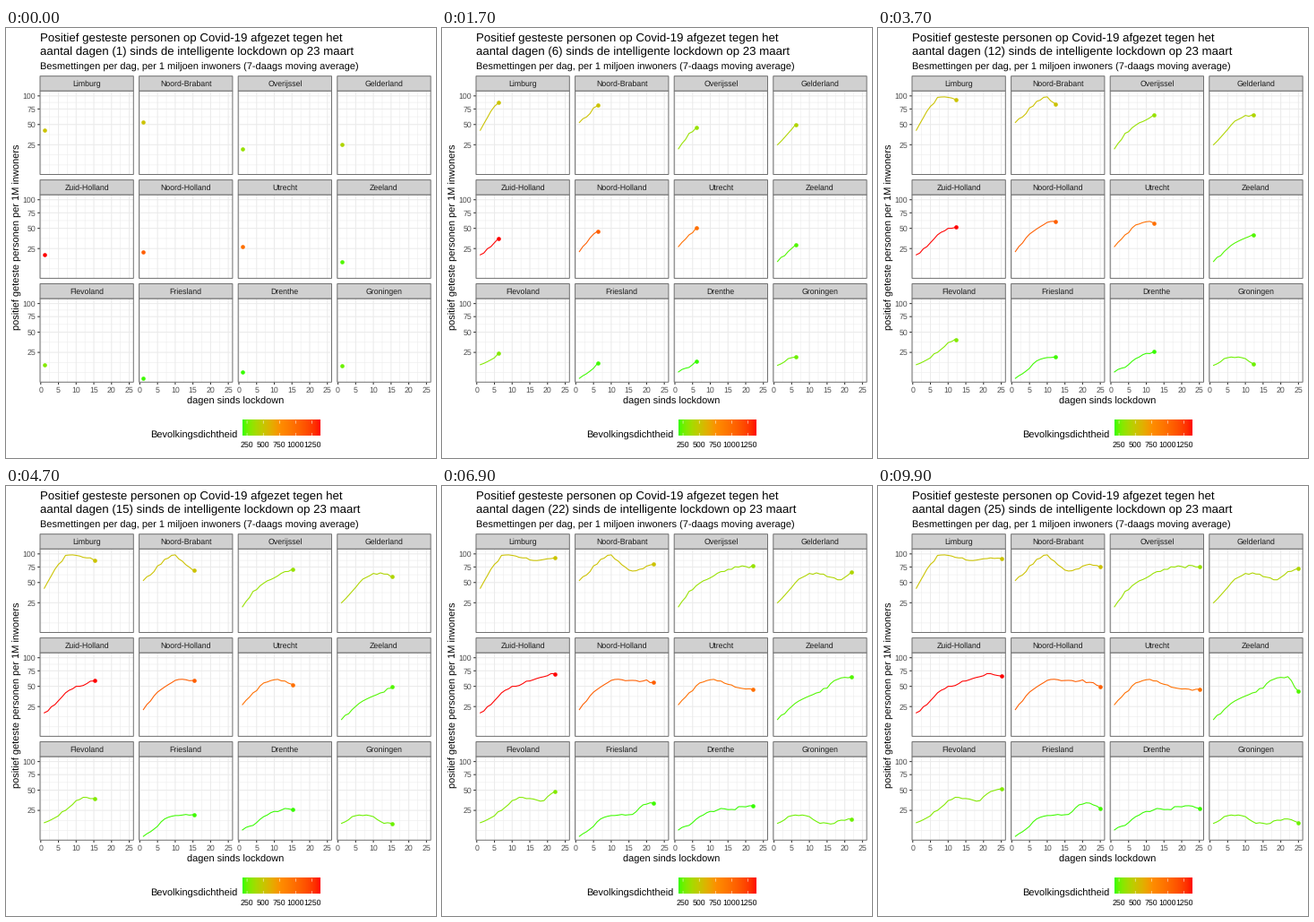
A matplotlib script that plays this animation: 480x480 px, repeating every 10 s.

```python
import numpy as np
import matplotlib.pyplot as plt
from matplotlib.animation import FuncAnimation
from matplotlib.collections import LineCollection
from matplotlib.colors import to_rgb
from matplotlib.patches import Rectangle

plt.rcParams.update({
    "font.family": "Liberation Sans",
    "text.hinting": "none",
    "path.snap": False,
})

SIZE = 480
FRAMES, MOVING, INTERVAL = 100, 80, 100

# Layout in pixels, y pointing down
LEFT, PANEL_W, COL_PITCH = 38, 104.3, 110.6
TOP, PANEL_H, ROW_PITCH, STRIP_H = 70.2, 93.3, 115.9, 16.5
RIGHT = LEFT + 3 * COL_PITCH + PANEL_W
BAR_X, BAR_Y, BAR_W, BAR_H = 264.2, 438.2, 86.4, 17.3

LINE_W, THIN_W = 1.07, 0.53
DARK, BORDER, TEXT = "#333333", "#707070", "#4d4d4d"
GRID, STRIP = "#ebebeb", "#d0d0d0"

# Scales: x linear, y square root, both with 5 % expansion
DAYS = np.arange(1, 26)
X_LO, X_HI = 1 - 0.05 * 24, 25 + 0.05 * 24
ROOT_MIN, ROOT_MAX = np.sqrt(5.5), np.sqrt(102.5)
PAD = 0.05 * (ROOT_MAX - ROOT_MIN)
DENSITY_LO, DENSITY_HI, DENSITY_MID = 183, 1374, 770

# Name, population density, cases on every third day
KEY_DAYS = DAYS[::3]
PROVINCES = [
    ("Limburg", 520, (42, 71, 97, 97, 92, 87, 89, 92, 91)),
    ("Noord-Brabant", 522, (53, 67, 89, 98, 79, 68, 72, 80, 75)),
    ("Overijssel", 348, (21, 38, 49, 57, 67, 71, 77, 78, 75)),
    ("Gelderland", 418, (25, 38, 55, 64, 63, 58, 54, 67, 73)),
    ("Zuid-Holland", 1374, (19, 27, 41, 50, 54, 60, 65, 70, 66)),
    ("Noord-Holland", 1075, (22, 37, 49, 59, 60, 59, 58, 56, 50)),
    ("Utrecht", 970, (27, 41, 55, 60, 58, 52, 47, 46, 46)),
    ("Zeeland", 214, (13.5, 22, 31, 37, 42, 54, 63, 65, 43)),
    ("Flevoland", 298, (14, 18, 25, 36, 40, 38, 36, 48, 52)),
    ("Friesland", 194, (5.5, 9.5, 17, 20, 21, 21, 31, 33, 27)),
    ("Drenthe", 187, (9, 12, 19, 24, 27, 26, 29, 30, 27)),
    ("Groningen", 252, (13.5, 19, 20, 19, 13.5, 13, 16, 17, 14)),
]
rng = np.random.default_rng(23)


def daily_roots(cases):
    """Daily values on the root scale, with a slight wobble between key days."""
    wobble = rng.normal(0, 0.06, DAYS.size) * ~np.isin(DAYS, KEY_DAYS)
    return np.interp(DAYS, KEY_DAYS, np.sqrt(cases)) + wobble


# Colour scale, blended in CIE Lab
TO_XYZ = np.array([[0.4124, 0.3576, 0.1805],
                   [0.2126, 0.7152, 0.0722],
                   [0.0193, 0.1192, 0.9505]])
WHITE = TO_XYZ.sum(axis=1)


def to_lab(color):
    c = np.array(to_rgb(color))
    lin = np.where(c > 0.04045, ((c + 0.055) / 1.055) ** 2.4, c / 12.92)
    fx, fy, fz = np.cbrt(TO_XYZ @ lin / WHITE)
    return np.array([116 * fy - 16, 500 * (fx - fy), 200 * (fy - fz)])


def from_lab(lab):
    fy = (lab[0] + 16) / 116
    f = np.array([fy + lab[1] / 500, fy, fy - lab[2] / 200])
    xyz = WHITE * np.where(f > 0.207, f ** 3, (f - 16 / 116) / 7.787)
    lin = np.clip(np.linalg.solve(TO_XYZ, xyz), 0, 1)
    return np.where(lin > 0.0031308, 1.055 * lin ** (1 / 2.4) - 0.055, 12.92 * lin)


STOPS = np.array([to_lab(c) for c in ("#00ff00", "#ff8c00", "#ff0000")])


def density_color(density):
    reach = max(DENSITY_HI - DENSITY_MID, DENSITY_MID - DENSITY_LO)
    t = (density - DENSITY_MID) / reach
    lab = [np.interp(t, [-1, 0, 1], STOPS[:, k]) for k in range(3)]
    return np.clip(from_lab(np.array(lab)), 0, 1)


fig = plt.figure(figsize=(SIZE / 72, SIZE / 72), dpi=72, facecolor="white")
ax = fig.add_axes([0, 0, 1, 1])
ax.axis("off")


def label(x, y, text, size, color="black", ha="center", va="baseline", **kw):
    return ax.text(x, y, text, size=size, color=color, ha=ha, va=va, **kw)


def segments(lines, width, color, z):
    ax.add_collection(LineCollection(lines, linewidths=width, colors=[color], zorder=z))


def box(x, y, w, h, fill):
    ax.add_patch(Rectangle((x, y), w, h, facecolor=fill, edgecolor=BORDER,
                           linewidth=1, zorder=5, snap=True))


def x_pos(day, left):
    return left + (day - X_LO) / (X_HI - X_LO) * PANEL_W


def y_pos(root, top):
    return top + (ROOT_MAX + PAD - root) / (ROOT_MAX - ROOT_MIN + 2 * PAD) * PANEL_H


X_TICKS = np.arange(0, 26, 5)
Y_TICKS = np.arange(25, 101, 25)
ROOTS = np.sqrt(Y_TICKS)
below = 2 * ROOTS[0] - ROOTS[1]
wide = np.append(below, ROOTS)
Y_MINOR = np.append(below, (wide[1:] + wide[:-1]) / 2)


def grid(left, top, days, levels, width, z):
    lines = [[(x, top), (x, top + PANEL_H)] for x in x_pos(days, left)]
    lines += [[(left, y), (left + PANEL_W, y)] for y in y_pos(levels, top)]
    segments(lines, width, GRID, z)


curves = []
for i, (name, density, cases) in enumerate(PROVINCES):
    row, col = divmod(i, 4)
    left, top = LEFT + col * COL_PITCH, TOP + row * ROW_PITCH
    bottom = top + PANEL_H

    grid(left, top, X_TICKS[:-1] + 2.5, Y_MINOR, THIN_W, 1)
    grid(left, top, X_TICKS, ROOTS, LINE_W, 2)
    box(left, top, PANEL_W, PANEL_H, "none")
    box(left, top - STRIP_H, PANEL_W, STRIP_H, STRIP)
    label(left + PANEL_W / 2, top - 4.8, name, 8.8, "#1a1a1a", zorder=6)

    if col == 0:
        ys = y_pos(ROOTS, top)
        segments([[(left - 2.75, y), (left, y)] for y in ys], LINE_W, DARK, 4)
        for y, value in zip(ys, Y_TICKS):
            label(left - 4.9, y + 3.2, str(value), 8.8, TEXT, ha="right")
    if row == 2:
        xs = x_pos(X_TICKS, left)
        segments([[(x, bottom), (x, bottom + 2.75)] for x in xs], LINE_W, DARK, 4)
        for x, value in zip(xs, X_TICKS):
            label(x, bottom + 11.7, str(value), 8.8, TEXT)

    color = density_color(density)
    line, = ax.plot([], [], color=color, lw=LINE_W, zorder=3)
    dot, = ax.plot([], [], "o", color=color, ms=4.6, mew=0, zorder=4, snap=False)
    curves.append((line, dot, daily_roots(cases), left, top))

label(38, 15, "Positief gesteste personen op Covid-19 afgezet tegen het", 13.2, ha="left")
title = label(38, 30, "", 13.2, ha="left")
label(38, 46.3, "Besmettingen per dag, per 1 miljoen inwoners (7-daags moving average)",
      11, ha="left")
label((LEFT + RIGHT) / 2, 420.2, "dagen sinds lockdown", 11)
label(18, 233, "positief geteste personen per 1M inwoners", 11,
      ha="right", va="center", rotation=90)

# Legend
label(161.3, 458.2, "Bevolkingsdichtheid", 11, ha="left")
ramp = np.array([[density_color(d) for d in np.linspace(DENSITY_LO, DENSITY_HI, 174)]])
ax.imshow(ramp, extent=(BAR_X, BAR_X + BAR_W, BAR_Y + BAR_H, BAR_Y), aspect="auto",
          interpolation="bilinear")
for value in range(250, 1251, 250):
    x = BAR_X + (value - DENSITY_LO) / (DENSITY_HI - DENSITY_LO) * BAR_W
    tick = BAR_H / 5
    segments([[(x, BAR_Y), (x, BAR_Y + tick)],
              [(x, BAR_Y + BAR_H - tick), (x, BAR_Y + BAR_H)]], THIN_W, "white", 4)
    label(x, 468.3, str(value), 8.8)

ax.set(xlim=(0, SIZE), ylim=(SIZE, 0))


def update(frame):
    now = 1 + 24 * min(frame / (MOVING - 1), 1)
    title.set_text(f"aantal dagen ({round(now)}) sinds de intelligente lockdown op 23 maart")
    past = DAYS < now
    for line, dot, levels, left, top in curves:
        x = x_pos(np.append(DAYS[past], now), left)
        y = y_pos(np.append(levels[past], np.interp(now, DAYS, levels)), top)
        line.set_data(x, y)
        dot.set_data(x[-1:], y[-1:])
    return []


anim = FuncAnimation(fig, update, frames=FRAMES, interval=INTERVAL,
                     init_func=lambda: [], repeat=True, repeat_delay=0)
plt.show()
```
